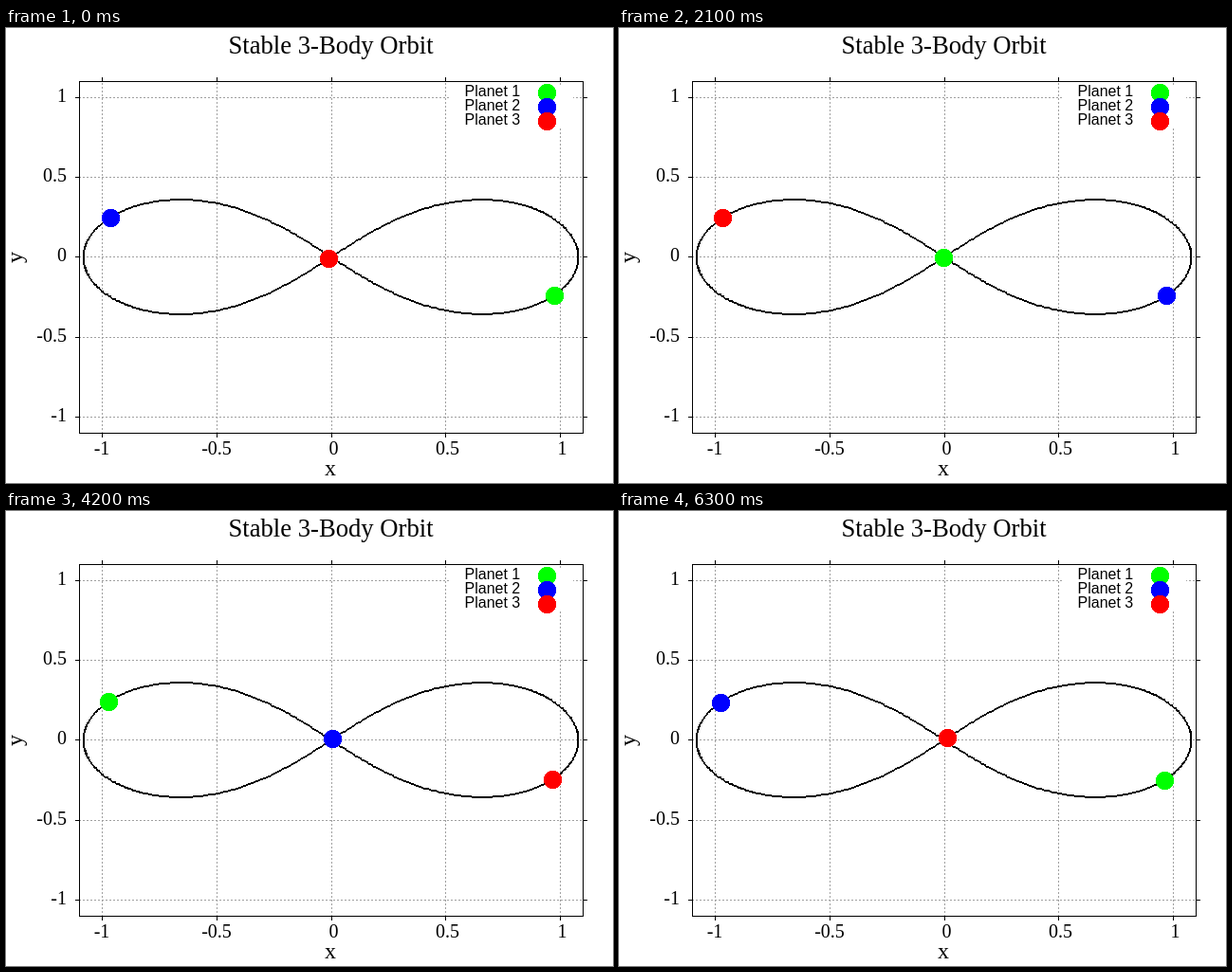
Write an HTML page with a canvas that moves like this. It is 640 px wide and 480 px high and loops after 6.4 s.

```html
<!DOCTYPE html>
<html>
<head>
<meta charset="utf-8">
<title>Stable 3-Body Orbit</title>
<style>
html, body { margin: 0; width: 640px; height: 480px; overflow: hidden; background: #fff; }
canvas { display: block; }
</style>
</head>
<body>
<canvas id="stage" width="640" height="480"></canvas>
<script>
const stage = document.getElementById("stage").getContext("2d");
const plot = { left: 77, right: 608, top: 56, bottom: 427 };
const key = { left: 469, right: 598, top: 60, bottom: 105 };
const ticks = [-1, -0.5, 0, 0.5, 1];
const colors = ["#00ff00", "#0000ff", "#ff0000"];
const STEP = 0.01, STEPS_PER_FRAME = 10, FRAMES = 64, FRAME_MS = 100;

const toX = x => Math.floor(plot.left + (x + 1.1) * (plot.right - plot.left) / 2.2 + 0.5);
const toY = y => 479 - Math.floor(52 + (y + 1.1) * (plot.bottom - plot.top) / 2.2 + 0.5);

// State: x, y of each body, followed by vx, vy of each body.
function derivative(s) {
  const d = [...s.slice(6), 0, 0, 0, 0, 0, 0];
  for (let i = 0; i < 3; i++) {
    for (let j = 0; j < 3; j++) {
      if (i === j) continue;
      const dx = s[2 * j] - s[2 * i], dy = s[2 * j + 1] - s[2 * i + 1];
      const r3 = Math.hypot(dx, dy) ** 3;
      d[6 + 2 * i] += dx / r3;
      d[7 + 2 * i] += dy / r3;
    }
  }
  return d;
}

function rungeKutta(s, h) {
  const shift = (d, f) => s.map((v, i) => v + d[i] * f);
  const a = derivative(s);
  const b = derivative(shift(a, h / 2));
  const c = derivative(shift(b, h / 2));
  const d = derivative(shift(c, h));
  return s.map((v, i) => v + h * (a[i] + 2 * b[i] + 2 * c[i] + d[i]) / 6);
}

function simulate() {
  const px = 0.97000436, py = -0.24308753, vx = 0.466203685, vy = 0.43236573;
  let s = [px, py, -px, -py, 0, 0, vx, vy, vx, vy, -2 * vx, -2 * vy];
  const states = [];
  for (let i = 0; i < FRAMES * STEPS_PER_FRAME; i++) states.push(s = rungeKutta(s, STEP));
  return states;
}

// Crisp two-pixel line, thickened across its main direction.
function thickLine(g, x0, y0, x1, y1) {
  const dx = x1 - x0, dy = y1 - y0;
  const n = Math.max(Math.abs(dx), Math.abs(dy));
  const flat = Math.abs(dx) > Math.abs(dy);
  for (let i = 0; i <= n && n; i++) {
    const x = Math.round(x0 + dx * i / n), y = Math.round(y0 + dy * i / n);
    if (flat) g.fillRect(x, y - 1, 1, 2);
    else g.fillRect(x - 1, y, 2, 1);
  }
}

function disc(g, x, y, color) {
  g.fillStyle = color;
  for (let dy = -9; dy <= 9; dy++) {
    const half = Math.floor(Math.sqrt(90.25 - dy * dy));
    g.fillRect(x - half, y + dy, 2 * half + 1, 1);
  }
}

function text(g, str, x, y, size, align, family = "'Liberation Serif', serif") {
  g.font = `${size}px ${family}`;
  g.textAlign = align;
  g.fillText(str, x, y);
}

function drawGrid(g) {
  g.fillStyle = "#a0a0a0";
  for (const t of ticks) {
    const x = toX(t), y = toY(t);
    for (let i = plot.left; i < plot.right; i += 4) g.fillRect(i, y, 2, 1);
    for (let i = plot.bottom; i > plot.top; i -= 4) g.fillRect(x, i - 1, 1, 2);
  }
  g.clearRect(key.left, key.top, key.right - key.left, key.bottom - key.top);
}

function drawAxes(g) {
  g.fillStyle = g.strokeStyle = "#000";
  g.strokeRect(plot.left + 0.5, plot.top + 0.5, plot.right - plot.left, plot.bottom - plot.top);
  for (const t of ticks) {
    const x = toX(t), y = toY(t), label = (t < 0 ? "" : " ") + t;
    g.fillRect(x, plot.top - 4, 1, 4);
    g.fillRect(x, plot.bottom + 1, 1, 4);
    g.fillRect(plot.left - 4, y, 4, 1);
    g.fillRect(plot.right + 1, y, 4, 1);
    text(g, label, x, 450, 20, "center");
    text(g, label, 64, y + 5, 20, "right");
  }
  text(g, "Stable 3-Body Orbit", 342.5, 27, 26.67, "center");
  text(g, "x", 342, 472, 24, "center");
  g.save();
  g.translate(17, 242);
  g.rotate(-Math.PI / 2);
  text(g, "y", 0, 0, 24, "center");
  g.restore();
}

function drawKey(g) {
  colors.forEach((color, i) => {
    g.fillStyle = "#000";
    text(g, `Planet ${i + 1}`, 483.5, 72 + 15 * i, 16, "left", "'Liberation Sans', sans-serif");
    disc(g, 570, 68 + 15 * i, color);
  });
}

function drawOrbit(g, states) {
  g.fillStyle = "#000";
  for (let i = 1; i < states.length; i++) {
    const [x0, y0] = states[i - 1], [x1, y1] = states[i];
    thickLine(g, toX(x0), toY(y0), toX(x1), toY(y1));
  }
}

const states = simulate();
const backdrop = document.createElement("canvas");
backdrop.width = 640;
backdrop.height = 480;
const back = backdrop.getContext("2d");
drawGrid(back);
drawOrbit(back, states);
drawAxes(back);
drawKey(back);

function render() {
  const frame = Math.floor(performance.now() / FRAME_MS) % FRAMES;
  const s = states[frame * STEPS_PER_FRAME];
  stage.fillStyle = "#fff";
  stage.fillRect(0, 0, 640, 480);
  stage.drawImage(backdrop, 0, 0);
  colors.forEach((color, i) => disc(stage, toX(s[2 * i]), toY(s[2 * i + 1]), color));
  requestAnimationFrame(render);
}
render();
</script>
</body>
</html>
```
